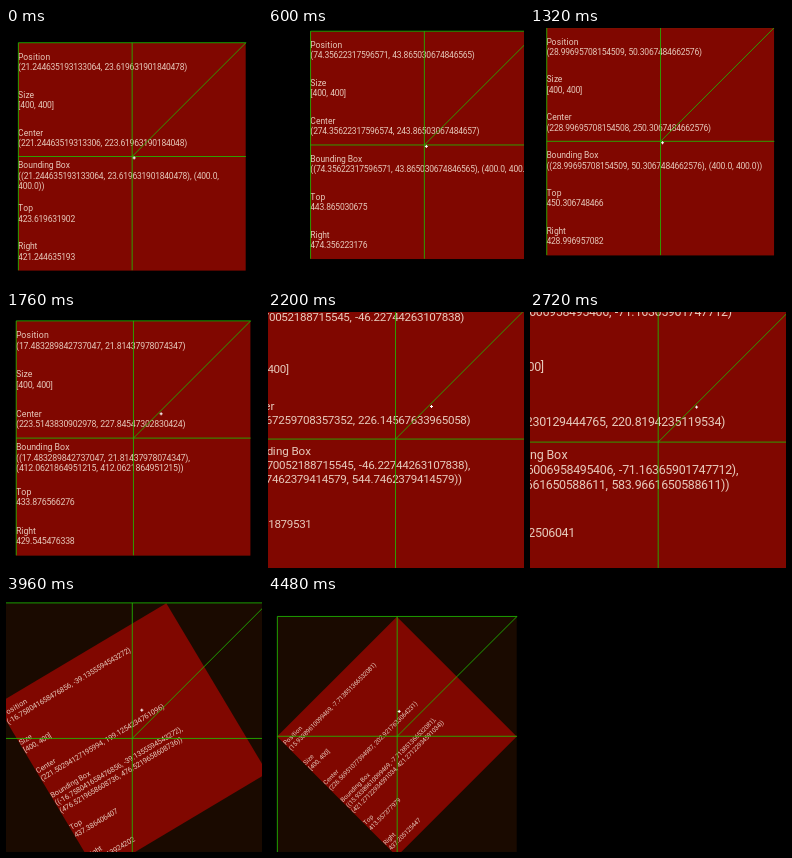
An HTML page with a canvas that plays this animation: 256 by 256 pixels, repeating every 4520 ms.

```html
<!DOCTYPE html>
<html lang="en">
<head>
<meta charset="utf-8">
<title>Scatter properties</title>
<style>
html, body { margin: 0; height: 100%; overflow: hidden; background: #000; }
canvas { display: block; width: 100vw; height: 100vh; }
</style>
</head>
<body>
<canvas id="stage"></canvas>
<script>
const LOOP = 4520, STEP = 40, WORLD = 450, SIDE = 400, LINE = 18;
const PINCH = 1720, SWAY = 9;
const canvas = document.getElementById('stage');
const ctx = canvas.getContext('2d');

// time, left, bottom, bounding size, angle in degrees
const pause = [-70, -75, 590, 0];
const poses = [
  [0, 21.244635193133064, 23.619631901840478, SIDE, 0],
  [600, 74.35622317596571, 43.865030674846565, SIDE, 0],
  [1320, 28.99695708154509, 50.3067484662576, SIDE, 0],
  [PINCH, 23.5, 28, SIDE, 0],
  [2200, -48.70052188715545, -46.22744263107838, 544.7462379414579, 0],
  [2800, ...pause],
  [3100, ...pause],
  [3320, -109.6997891940911, -125.57718545626939, 678.2844831611069, 8.2],
  [3960, -16.758041658476856, -39.1355594543272, 476.5219658608736, 30.8],
  [4480, 15.93389610099469, -7.713851366532081, 421.27122934591034, 45]
];

function poseAt(t) {
  const i = poses.findLastIndex(p => p[0] <= t);
  const a = poses[i], b = poses[i + 1] || a;
  const u = a === b ? 0 : (t - a[0]) / (b[0] - a[0]);
  const [, x, y, size, angle] = a.map((v, n) => v + (b[n] - v) * u);
  // Dragging by hand dips below and then rises above the straight line
  const sway = t < PINCH ? SWAY * Math.sin(2 * Math.PI * u) : 0;
  return { x, y: y + sway, size, turn: angle * Math.PI / 180 };
}

const float = v => Number.isInteger(v) ? v.toFixed(1) : String(v);
const pair = (a, b) => `(${float(a)}, ${float(b)})`;
const short = v => String(Number(v.toPrecision(12)));

// Glyph advances are rounded to whole units
const advance = ch => Math.round(ctx.measureText(ch).width);
const width = s => [...s].reduce((w, ch) => w + advance(ch), 0);

function wrap(text) {
  const lines = [];
  let line = '';
  for (const word of text.split(' ')) {
    const next = line ? line + ' ' + word : word;
    if (line && width(next) > SIDE) {
      lines.push(line);
      line = word;
    } else line = next;
  }
  return [...lines, line];
}

function drawLabel(row, title, value) {
  const lines = [title, ...wrap(value)];
  const top = (row + 0.5) * SIDE / 6 - lines.length * LINE / 2;
  lines.forEach((line, n) => {
    let x = 0;
    for (const ch of line) {
      ctx.fillText(ch, x, top + n * LINE + 14);
      x += advance(ch);
    }
  });
}

// Lines run through the centres of unit cells
function path(...points) {
  ctx.beginPath();
  points.forEach(([x, y]) => ctx.lineTo(x + 0.5, WORLD - y - 0.5));
  ctx.stroke();
}

function drawPointer(x, y) {
  const unit = WORLD / 256;
  ctx.fillStyle = '#fff';
  ctx.fillRect(x - 1.5 * unit, y - unit / 2, 3 * unit, unit);
  ctx.fillRect(x - unit / 2, y - 1.5 * unit, unit, 3 * unit);
}

function draw(t) {
  const { x, y, size, turn } = poseAt(t);
  const zoom = size / SIDE / (Math.cos(turn) + Math.sin(turn));
  const cx = x + size / 2, cy = y + size / 2, right = x + size, top = y + size;

  const dpr = window.devicePixelRatio || 1;
  const w = Math.round(innerWidth * dpr), h = Math.round(innerHeight * dpr);
  if (canvas.width !== w || canvas.height !== h) {
    canvas.width = w;
    canvas.height = h;
  }
  ctx.setTransform(w / WORLD, 0, 0, h / WORLD, 0, 0);
  ctx.fillStyle = '#000';
  ctx.fillRect(0, 0, WORLD, WORLD);
  ctx.fillStyle = '#1a0a00';
  ctx.fillRect(x, WORLD - top, size, size);

  ctx.save();
  ctx.translate(cx, WORLD - cy);
  ctx.rotate(-turn);
  ctx.scale(zoom, zoom);
  ctx.translate(-SIDE / 2, -SIDE / 2);
  ctx.fillStyle = '#800700';
  ctx.fillRect(0, 0, SIDE, SIDE);
  ctx.fillStyle = '#e6cabb';
  ctx.font = '15px Roboto, sans-serif';
  [
    ['Position', pair(x, y)],
    ['Size', '[400, 400]'],
    ['Center', pair(cx, cy)],
    ['Bounding Box', `(${pair(x, y)}, ${pair(size, size)})`],
    ['Top', short(top)],
    ['Right', short(right)]
  ].forEach(([title, value], row) => drawLabel(row, title, value));
  ctx.restore();

  ctx.strokeStyle = '#22b800';
  ctx.lineWidth = 1.5;
  path([x, y], [x, top], [right, top], [cx, cy]);
  path([x, cy], [right, cy]);
  path([cx, y], [cx, top]);

  // The pointer drags near the centre, then grips a point that turns with the square
  const reach = t < PINCH ? 0 : 62 * zoom, aim = turn + Math.PI / 4;
  drawPointer(cx + 4 + reach * Math.cos(aim), WORLD - cy + 2 - reach * Math.sin(aim));
}

const start = performance.now();
function tick(now) {
  const t = Math.max(0, now - start) % LOOP;
  draw(Math.floor(t / STEP) * STEP);
  requestAnimationFrame(tick);
}
draw(0);
requestAnimationFrame(tick);
</script>
</body>
</html>
```
